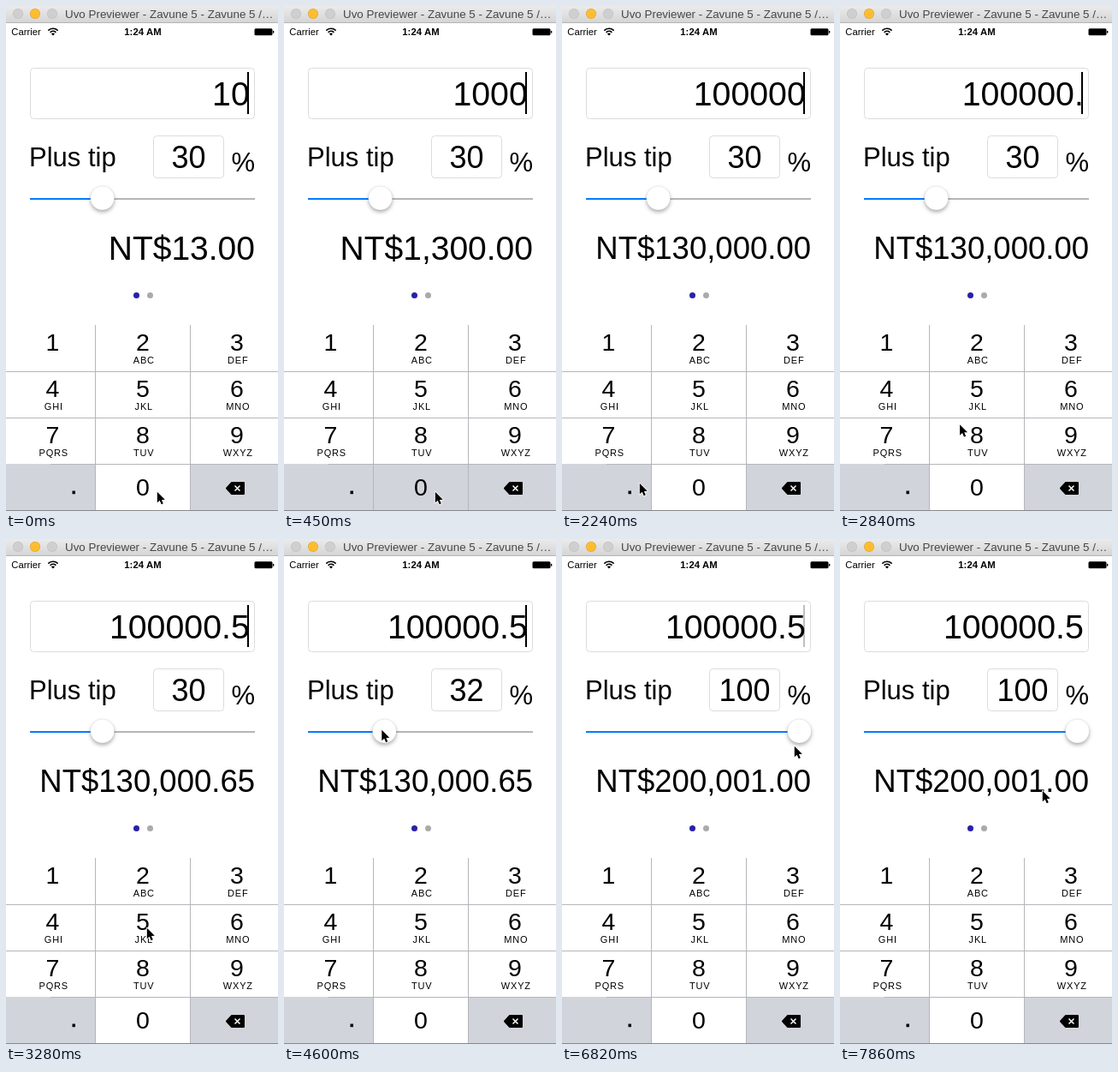
These frames come from a looping animation (318 by 589 pixels, 8 s). An HTML page with a canvas:

```html
<!DOCTYPE html>
<html lang="en">
<head>
<meta charset="utf-8">
<title>Tip calculator</title>
<style>
  html, body { margin: 0; width: 100%; height: 100%; overflow: hidden; background: #fff; }
  canvas { display: block; width: 318px; height: 589px; }
</style>
</head>
<body>
<canvas id="stage"></canvas>
<script>
const W = 318, H = 589, LOOP = 8000;
const FONT = '"Liberation Sans", Arial, sans-serif';
const KEY_GRAY = '#d1d5db', LINE = '#b4b6ba';
const COLS = [0, 105, 216, W], ROWS = [372, 427, 481, 535, 588];
const LETTERS = ['', 'ABC', 'DEF', 'GHI', 'JKL', 'MNO', 'PQRS', 'TUV', 'WXYZ'];

// Tracks are keyed by tick: [tick, value...]
const POINTER = [
  [0, 176, 565], [9, 176, 565], [12, 177, 567], [13, 177, 567],
  [15, 90, 555], [17, 90, 555], [20, 164, 452], [22, 164, 452],
  [29, 112, 221], [30, 112, 221], [31, 113.5, 221],
  [38, 275, 230], [39, 294.5, 231], [40, 271, 240], [50, 271, 240], [53, 236, 292]
];
const TIP = [[0, 30], [30, 30], [31, 32], [33, 43], [36, 73], [38, 86], [39, 90], [40, 100]];
const AMOUNT = [[0, '10'], [1, '100'], [2, '1000'], [5, '10000'], [8, '100000'], [17, '100000.'], [22, '100000.5']];
const PRESSED = { 1: '0', 3: '0', 4: '0', 7: '0', 16: '.', 15: '.', 21: '5' };

const canvas = document.getElementById('stage');
const ctx = canvas.getContext('2d');
const dpr = window.devicePixelRatio || 1;
canvas.width = W * dpr;
canvas.height = H * dpr;

const tickAt = t => Math.floor(t < 2090 ? t / 150 : 14 + (t - 2085) / 147.5);

function lerpTrack(track, k) {
  const i = track.findIndex(p => p[0] > k);
  if (i < 0) return track[track.length - 1].slice(1);
  const a = track[i - 1], b = track[i], u = (k - a[0]) / (b[0] - a[0]);
  return a.slice(1).map((v, j) => v + (b[j + 1] - v) * u);
}

const stepTrack = (track, k) => track.filter(p => p[0] <= k).pop()[1];
const tipAt = k => Math.round(lerpTrack(TIP, Math.max(k, 0))[0]);

function caretAlpha(k) {
  if (k < 10 || (k >= 14 && k < 27)) return 1;
  const phase = k < 14 ? k - 10 : (k - 27) % 6;
  return [0.55, 0.25, 0, 0.4, 1, 1][phase];
}

function rect(x, y, w, h, color) {
  ctx.fillStyle = color;
  ctx.fillRect(x, y, w, h);
}

function circle(x, y, r, color) {
  ctx.fillStyle = color;
  ctx.beginPath();
  ctx.arc(x, y, r, 0, Math.PI * 2);
  ctx.fill();
}

function text(str, x, y, size, { align = 'left', color = '#000', weight = 400, gap = 0 } = {}) {
  ctx.font = `${weight} ${size}px ${FONT}`;
  ctx.textAlign = align;
  ctx.letterSpacing = gap + 'px';
  ctx.fillStyle = color;
  ctx.fillText(str, x, y);
}

function polygon(points, fill, stroke, width) {
  ctx.beginPath();
  points.forEach(([x, y]) => ctx.lineTo(x, y));
  ctx.closePath();
  ctx.lineJoin = 'round';
  ctx.strokeStyle = stroke;
  ctx.lineWidth = width;
  ctx.stroke();
  ctx.fillStyle = fill;
  ctx.fill();
}

function box(x, y, w, h) {
  ctx.beginPath();
  ctx.roundRect(x + 0.5, y + 0.5, w - 1, h - 1, 4);
  ctx.strokeStyle = '#dcdcdc';
  ctx.lineWidth = 1;
  ctx.stroke();
}

function titleBar() {
  const g = ctx.createLinearGradient(0, 0, 0, 20);
  g.addColorStop(0, '#ebebeb');
  g.addColorStop(1, '#d4d4d4');
  rect(0, 0, W, 20, g);
  rect(0, 19, W, 1, '#b5b5b5');
  ['#cfcfcf', '#fdbd2f', '#cfcfcf'].forEach((color, i) => {
    circle(14 + 20 * i, 9, 6, i === 1 ? '#e0a030' : '#bebebe');
    circle(14 + 20 * i, 9, 5.4, color);
  });
  text('Uvo Previewer - Zavune 5 - Zavune 5 /…', 69, 14, 13.4, { color: '#474747' });
}

function statusBar() {
  text('Carrier', 6.3, 34, 11.3);
  ctx.strokeStyle = '#000';
  ctx.lineWidth = 1.6;
  for (const r of [4.6, 7.8]) {
    ctx.beginPath();
    ctx.arc(55, 34, r, -Math.PI * 0.76, -Math.PI * 0.24);
    ctx.stroke();
  }
  ctx.fillStyle = '#000';
  ctx.beginPath();
  ctx.moveTo(55, 34.5);
  ctx.arc(55, 34.5, 2.8, -Math.PI * 0.76, -Math.PI * 0.24);
  ctx.fill();
  text('1:24 AM', 160, 34, 11.3, { align: 'center', weight: 700 });
  ctx.beginPath();
  ctx.roundRect(290.5, 26.3, 21, 8, 1.5);
  ctx.fill();
  rect(312, 29, 1.3, 2.6, '#000');
}

function slider(tip) {
  const x = 42 + 2.355 * tip;
  rect(28, 224, 263, 2, '#b6b6b6');
  rect(28, 224, x - 28, 2, '#057bff');
  ctx.save();
  ctx.shadowColor = 'rgba(0,0,0,.3)';
  ctx.shadowBlur = 4 * dpr;
  ctx.shadowOffsetY = 2.5 * dpr;
  circle(x, 224, 14, '#fff');
  ctx.restore();
  ctx.strokeStyle = 'rgba(0,0,0,.12)';
  ctx.lineWidth = 0.6;
  ctx.beginPath();
  ctx.arc(x, 224, 14, 0, Math.PI * 2);
  ctx.stroke();
}

function form(k) {
  const amount = stepTrack(AMOUNT, k), tip = tipAt(k);
  // The total trails the slider by one tick while dragging.
  const rate = k >= 40 ? 100 : tipAt(k - 1);
  const total = parseFloat(amount) * (100 + rate) / 100;
  const label = 'NT$' + total.toLocaleString('en-US', { minimumFractionDigits: 2, maximumFractionDigits: 2 });
  const long = label.length > 12;

  box(28, 72, 263, 60);
  text(amount, 284.8, 116, 39.3, { align: 'right' });
  rect(282, 77, 2, 49, `rgba(0,0,0,${caretAlpha(k)})`);

  text('Plus tip', 27, 187, 31);
  box(172, 151, 83, 50);
  text(String(tip), 213.5, 189, 36, { align: 'center' });
  text('%', 291, 193, 31, { align: 'right' });
  slider(tip);
  text(label, 291, long ? 295 : 296, long ? 36.5 : 39, { align: 'right' });

  circle(152.5, 337.5, 3.5, '#2a20a8');
  circle(168.5, 337.5, 3.5, '#aaaaaa');
}

function deleteIcon() {
  polygon([[258, 562.5], [264, 556], [278, 556], [278, 569], [264, 569]], '#000', '#000', 2);
  ctx.strokeStyle = '#fff';
  ctx.lineWidth = 1.5;
  ctx.beginPath();
  for (const d of [-3, 3]) {
    ctx.moveTo(270.5 - d, 559.5);
    ctx.lineTo(270.5 + d, 565.5);
  }
  ctx.stroke();
}

function keypad(pressed) {
  const fillKey = (col, row, color) =>
    rect(COLS[col], ROWS[row], COLS[col + 1] - COLS[col], ROWS[row + 1] - ROWS[row], color);
  // Only the right half of the point key repaints when pressed.
  fillKey(0, 3, KEY_GRAY);
  if (pressed === '.') rect(52, 535, 53, 53, '#d1d5db');
  fillKey(2, 3, KEY_GRAY);
  if (pressed === '0') fillKey(1, 3, KEY_GRAY);
  if (pressed === '5') fillKey(1, 1, KEY_GRAY);

  for (const x of [104, 215]) rect(x, 372, 1, 216, LINE);
  for (const y of [426, 480]) rect(0, y, W, 1, LINE);
  rect(0, 534, 52, 1, KEY_GRAY);
  rect(52, 534, W - 52, 1, LINE);
  rect(0, 588, W, 1, '#85878a');

  LETTERS.forEach((letters, i) => {
    const x = [54.5, 160, 270][i % 3], y = 402 + 54 * Math.floor(i / 3);
    text(String(i + 1), x, y, 28.5, { align: 'center' });
    text(letters, x + 1.3, y + 15, 11, { align: 'center', gap: 0.8 });
  });
  text('0', 160, 571, 28.5, { align: 'center' });
  rect(77.5, 565.5, 3.5, 3.7, '#000');
  deleteIcon();
}

function pointer(x, y) {
  const shape = [[0, 0], [0, 12.5], [2.9, 9.9], [4.9, 14.4], [7, 13.5], [5.1, 9.2], [9, 9]];
  polygon(shape.map(([dx, dy]) => [x + 0.8 + dx, y + 1.8 + dy]), '#000', '#fff', 1.8);
}

function draw(t) {
  const k = tickAt(t);
  ctx.setTransform(dpr, 0, 0, dpr, 0, 0);
  rect(0, 0, W, H, '#fff');
  titleBar();
  statusBar();
  form(k);
  keypad(PRESSED[k]);
  pointer(...lerpTrack(POINTER, k));
}

const start = performance.now();
function loop() {
  draw((performance.now() - start) % LOOP);
  requestAnimationFrame(loop);
}
loop();
</script>
</body>
</html>
```
